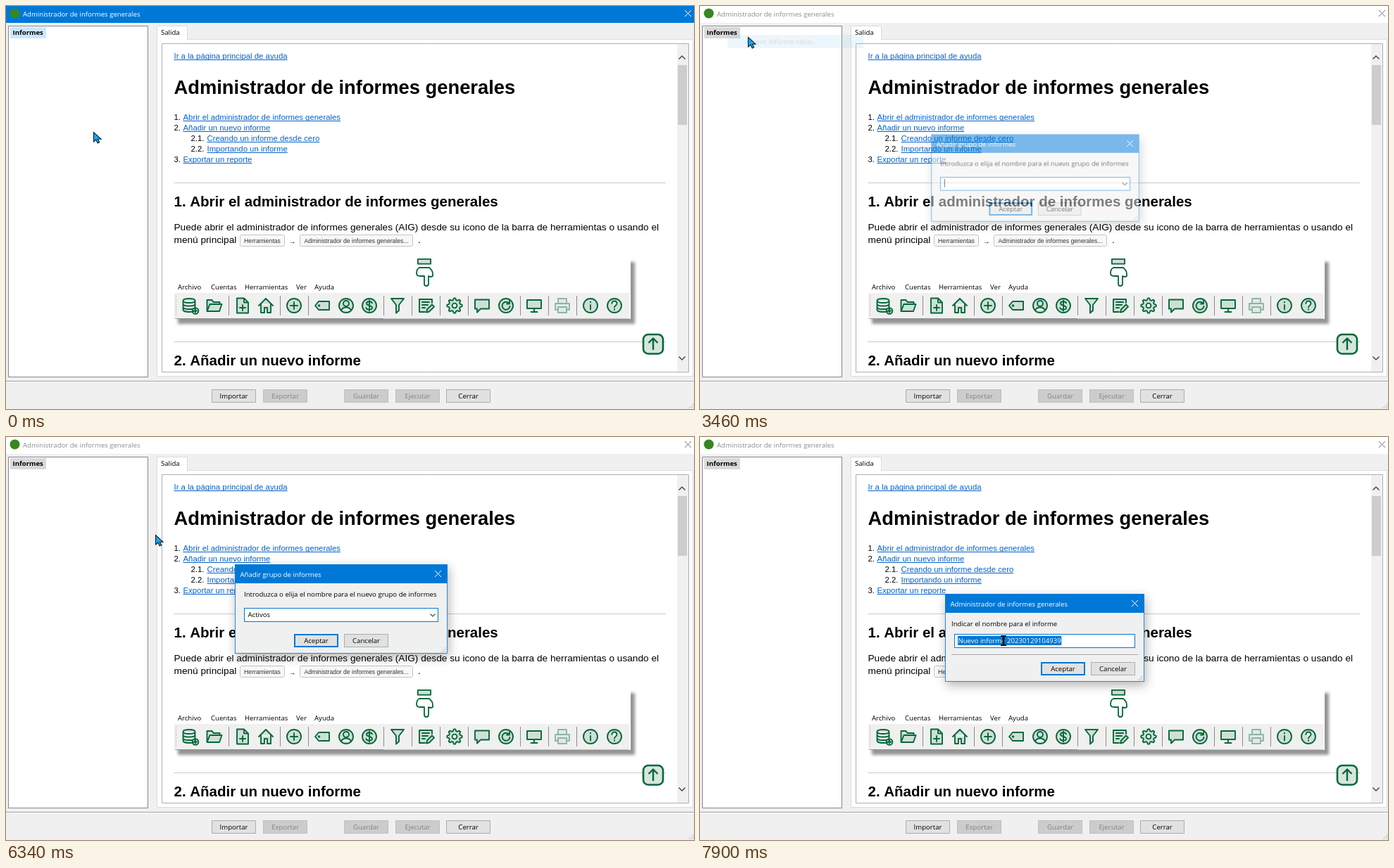
These frames come from a looping animation (977 by 573 pixels, 8 s). An HTML page with a canvas:

```html
<!DOCTYPE html>
<html lang="es">
<head>
<meta charset="utf-8">
<title>Administrador de informes generales</title>
<style>
html, body { margin: 0; width: 100%; height: 100%; overflow: hidden; background: #f0f0f0; }
canvas { display: block; }
</style>
</head>
<body>
<canvas id="stage" width="977" height="573"></canvas>
<script>
const W = 977, H = 573, LOOP = 8000;
const stage = document.getElementById('stage').getContext('2d');
const layerCanvas = document.createElement('canvas');
layerCanvas.width = W;
layerCanvas.height = H;
const layer = layerCanvas.getContext('2d');
let g = stage;

const UI = '9.6px "Open Sans", sans-serif';
const UI_BOLD = 'bold ' + UI;
const page = (px, bold) => (bold ? 'bold ' : '') + px + 'px "Liberation Sans", Arial, sans-serif';
const BLUE = '#0078d7', GREEN = '#05673a', PALE = '#cfdfd6';
const TITLE = 'Administrador de informes generales';

// Drawing helpers
function rect(x, y, w, h, fill, border, lw = 1) {
  if (fill) { g.fillStyle = fill; g.fillRect(x, y, w, h); }
  if (border) {
    g.strokeStyle = border;
    g.lineWidth = lw;
    g.strokeRect(x + lw / 2, y + lw / 2, w - lw, h - lw);
  }
}

function shadowed(x, y, w, h, fill, color, blur, dx, dy) {
  g.save();
  g.shadowColor = color;
  g.shadowBlur = blur;
  g.shadowOffsetX = dx;
  g.shadowOffsetY = dy;
  rect(x, y, w, h, fill);
  g.restore();
}

function text(s, x, y, font = UI, color = '#000', align = 'left') {
  g.font = font;
  g.fillStyle = color;
  g.textAlign = align;
  g.fillText(s, x, y);
}

function stroke(d, color, lw = 1) {
  g.strokeStyle = color;
  g.lineWidth = lw;
  g.stroke(new Path2D(d));
}

function disc(x, y, r, color) {
  g.fillStyle = color;
  g.beginPath();
  g.arc(x, y, r, 0, 7);
  g.fill();
}

function link(s, x, y) {
  text(s, x, y, page(11.37), '#0563c9');
  rect(x, y + 1, g.measureText(s).width, 1, '#0563c9');
}

function button(s, x, y, state = 'normal') {
  const looks = {
    normal: ['#e1e1e1', '#adadad', 1],
    off: ['#cccccc', '#bfbfbf', 1],
    main: ['#e1e1e1', BLUE, 2],
    hover: ['#e5f1fb', BLUE, 1],
    down: ['#cce4f7', '#005499', 1]
  };
  const [fill, border, lw] = looks[state];
  rect(x, y, 63, 19, fill, border, lw);
  text(s, x + 31.5, y + 13, UI, state === 'off' ? '#838383' : '#000', 'center');
}

function cross(x, y, color) {
  stroke(`M${x - 4.5} ${y - 4.5}l9 9m0-9l-9 9`, color);
}

function grip(x, y) {
  for (let i = 0; i < 3; i++)
    for (let j = 0; j <= i; j++) rect(x - 2 - j * 2.6, y - 7 + i * 2.6, 1.4, 1.4, '#bbb');
}

// Toolbar icons on a 24 unit grid
const ring = (x, y, r) => `M${x - r} ${y}a${r} ${r} 0 1 0 ${2 * r} 0a${r} ${r} 0 1 0 ${-2 * r} 0z`;

function icon(x, d, alpha = 1) {
  const p = new Path2D(d);
  g.save();
  g.globalAlpha = alpha;
  g.translate(x - 12, 414);
  g.lineJoin = g.lineCap = 'round';
  g.fillStyle = PALE;
  g.fill(p);
  g.strokeStyle = GREEN;
  g.lineWidth = 1.9;
  g.stroke(p);
  g.restore();
}

function gear() {
  let d = '';
  for (let i = 0; i < 32; i++) {
    const r = i % 4 < 2 ? 10.7 : 8, a = (i - 0.5) * Math.PI / 16;
    d += (i ? 'L' : 'M') + (12 + r * Math.cos(a)) + ' ' + (12 + r * Math.sin(a));
  }
  return d + 'z' + ring(12, 12, 3.4);
}

function toolbar() {
  shadowed(238, 357, 649, 88, '#fff', 'rgba(0,0,0,.42)', 4, 6, 6.5);
  rect(239, 408, 646, 37, '#f0f0f0');
  rect(239, 444, 646, 1, '#c4c4c4');
  rect(242, 444, 294, 1, '#8f8f8f');
  for (let y = 412; y < 442; y += 3) rect(241, y, 1, 1, '#999');

  text('Archivo', 244, 403);
  text('Cuentas', 291, 403);
  text('Herramientas', 339, 403);
  text('Ver', 412, 403);
  text('Ayuda', 438, 403);
  for (const x of [316, 389, 429, 536, 576, 616, 656, 730, 770, 810]) rect(x, 412, 1, 28, '#8c8c8c');

  const big = ring(12, 12, 10);
  icon(262, 'M1.5 5c0-4 17-4 17 0v13c0 4-17 4-17 0zM1.5 5c0 4 17 4 17 0M1.5 9.5c0 4 17 4 17 0M1.5 14c0 4 17 4 17 0'
    + ring(19, 19.5, 4.3) + 'M19 17.5v4M17 19.5h4');
  icon(296, 'M1.5 20V4h7l2 3h9v3M1.5 20l4-10h17l-3.5 10z');
  icon(336, 'M4 1.5h10l6 6v15H4zM14 1.5v6h6M12 11v8M8 15h8');
  icon(369, 'M2 12L12 2l10 10M5 9.5V22h5v-7h4v7h5V9.5');
  icon(409, big + 'M12 7v10M7 12h10');
  icon(449, 'M2 12l5-6h15v12H7z' + ring(7.5, 12, 0.8));
  icon(483, big + ring(12, 9, 4) + 'M5 19c2-6 12-6 14 0');
  icon(516, big + 'M16 8.5c-1-3-8-3-8 .5c0 3.5 8 2.5 8 6c0 3.5-8 3.5-8.5 0M12 4.5v15');
  icon(556, 'M3 2h18l-7 9v8l-4 3.5V11z');
  icon(597, 'M20 8V3H2v18h8M6 7h10M6 11h8M6 15h4M12 21.5l1-4 7-7 3 3-7 7z');
  icon(637, gear());
  icon(676, 'M2 3.5h20v13H10l-5 5v-5H2z');
  icon(710, big + 'M16.5 9a5.5 5.5 0 1 0 1 4M17 5.5V9.5h-4');
  icon(750, 'M2 4h20v12H2zM12 16v5M7.5 21h9');
  icon(790, 'M6 9V2h12v7M6 18H2V9h20v9h-4M6 14h12v8H6z', 0.4);
  icon(830, big + 'M12 11v6.5M12 6.8v.6');
  icon(864, big + 'M8.5 9c0-5 7-4.5 7 0c0 3-3.5 2.5-3.5 5.5M12 17.3v.5');

  g.lineJoin = 'round';
  rect(584, 359, 20, 8.5, PALE, GREEN, 1.8);
  stroke('M587 372h14q5 4 5 9v3q-3 2-6 0v11q0 3-3 3t-3-3v-11h-6q-5 0-5-4 0-6 4-8z', GREEN, 1.8);
}

function helpPage() {
  link('Ir a la página principal de ayuda', 238.5, 75);
  text(TITLE, 238.5, 125, page(27.35, true));

  const items = [
    ['1.', 'Abrir el administrador de informes generales', 238.5, 251.5],
    ['2.', 'Añadir un nuevo informe', 238.5, 251.5],
    ['2.1.', 'Creando un informe desde cero', 262.5, 285.5],
    ['2.2.', 'Importando un informe', 262.5, 285.5],
    ['3.', 'Exportar un reporte', 238.5, 251.5]
  ];
  items.forEach(([n, s, x, lx], i) => {
    const y = 162 + i * 15;
    text(n, x, y, page(11.37));
    link(s, lx, y);
  });

  rect(238, 251, 699, 1, '#cbcbcb');
  text('1. Abrir el administrador de informes generales', 238.5, 285, page(20.5, true));
  text('Puede abrir el administrador de informes generales (AIG) desde su icono de la barra de herramientas o usando el',
    238.5, 319, page(13.67));
  text('menú principal', 238.5, 337, page(13.67));
  for (const [s, x, w] of [['Herramientas', 332.5, 63], [TITLE + '...', 417.5, 160]]) {
    g.beginPath();
    g.roundRect(x, 325.5, w, 16, 2);
    g.fillStyle = '#f8f8f8';
    g.fill();
    g.strokeStyle = '#c4c4c4';
    g.lineWidth = 1;
    g.stroke();
    text(s, x + w / 2, 337, page(8.63), '#333', 'center');
  }
  text('→', 402, 338, page(9.5));
  text('.', 585, 337, page(13.67));

  toolbar();

  rect(238, 477, 699, 1, '#cbcbcb');
  text('2. Añadir un nuevo informe', 238.5, 511, page(20.5, true));

  g.beginPath();
  g.roundRect(905, 467, 28, 27.5, 7);
  g.fillStyle = '#d6e6dc';
  g.fill();
  g.strokeStyle = GREEN;
  g.lineWidth = 2.6;
  g.stroke();
  stroke('M919 489v-16M912.5 479l6.5-6.5 6.5 6.5', GREEN, 2.4);
}

function mainWindow(active) {
  rect(0, 0, W, H, '#f0f0f0');
  rect(0, 0, W, 24, active ? BLUE : '#fff');
  disc(12.5, 10.5, 7, '#37861f');
  text(TITLE, 24, 15, UI, active ? '#fff' : '#8c8c8c');
  cross(968.5, 10.5, active ? '#fff' : '#777');

  rect(3, 28, 199, 500, '#fff', '#828790');
  rect(6, 30, 51, 16, active ? '#cce8ff' : '#d9d9d9');
  text('Informes', 9.5, 41, UI_BOLD);

  rect(214, 47, 762, 480, '#fff', '#dcdcdc');
  rect(214, 28, 44, 21, '#fff', '#dcdcdc');
  rect(215, 46, 42, 4, '#fff');
  text('Salida', 220, 41);
  rect(221, 53, 749, 468, '#fff', '#acafb5');
  helpPage();

  rect(953, 54, 16, 466, '#f0f0f0');
  rect(954, 84, 13, 85, '#cdcdcd');
  stroke('M955.5 75.5l4.5-4.5 4.5 4.5M955.5 498.5l4.5 4.5 4.5-4.5', '#505050', 1.6);

  rect(0, 533, W, 1, '#a0a0a0');
  rect(0, 534, W, 1, '#fff');
  button('Importar', 292, 545);
  button('Exportar', 365, 545, 'off');
  button('Guardar', 480, 545, 'off');
  button('Ejecutar', 553, 545, 'off');
  button('Cerrar', 625, 545);
  grip(977, 572);
}

function menuItem(s, y, on = true) {
  text(s, 66.5, y + 4, UI, on ? '#000' : '#6d6d6d');
}

function menu(hot) {
  shadowed(37, 39, 198, 154, '#f2f2f2', 'rgba(0,0,0,.55)', 3, 2.5, 2.5);
  rect(37, 39, 198, 154, null, '#cccccc');
  if (hot) rect(39, 41, 193, 19, '#91c9f7');
  menuItem('Nuevo informe vacío...', 50);
  menuItem('Nuevo informe de ejemplo', 69);
  menuItem('Renombrar grupo...', 94, false);
  menuItem('Desagrupar', 112, false);
  menuItem('Renombrar informe...', 131, false);
  menuItem('Activo', 156, false);
  menuItem('Borrar informe...', 181, false);
  for (const y of [81, 144, 168]) rect(63, y, 168, 1, '#d2d2d2');
  stroke('M221.5 66l3 3-3 3', '#222');
}

function frame(x, y, w, h, title) {
  shadowed(x, y, w, h, '#f0f0f0', 'rgba(0,0,0,.3)', 14, 2, 5);
  rect(x, y, w, h, null, '#2b8ad8');
  rect(x, y, w, 27, BLUE);
  text(title, x + 7.5, y + 18, UI, '#fff');
  cross(x + w - 13.5, y + 13.5, '#fff');
  grip(x + w - 2, y + h - 2);
}

function groupDialog(value, caret, state) {
  frame(325, 181, 302, 127, 'Añadir grupo de informes');
  text('Introduzca o elija el nombre para el nuevo grupo de informes', 338, 227);
  rect(338, 243, 276, 20, '#fff', BLUE);
  stroke('M602.5 251.5l3.5 3.5 3.5-3.5', '#444', 1.1);
  text(value, 343.5, 256);
  if (caret) rect(Math.round(344 + g.measureText(value).width), 246, 1, 12, '#000');
  button('Aceptar', 409, 280, state);
  button('Cancelar', 480, 280);
}

function nameDialog() {
  frame(348, 223, 283, 125, TITLE);
  text('Indicar el nombre para el informe', 357, 269);
  rect(361, 280, 257, 20, '#fff', BLUE);
  const s = 'Nuevo informe 20230129104939';
  g.font = UI;
  rect(366, 283, g.measureText(s).width + 1, 13, BLUE);
  text(s, 366.5, 293, UI, '#fff');
  rect(357, 309, 265, 1, '#a0a0a0');
  rect(357, 310, 265, 1, '#fff');
  button('Aceptar', 484, 320, 'main');
  button('Cancelar', 555, 320);
}

// Draws a group of shapes as one translucent, scaled sheet
function sheet(alpha, scale, cx, cy, draw) {
  if (alpha <= 0) return;
  layer.clearRect(0, 0, W, H);
  g = layer;
  draw();
  g = stage;
  g.save();
  g.globalAlpha = alpha;
  g.translate(cx, cy);
  g.scale(scale, scale);
  g.drawImage(layerCanvas, -cx, -cy);
  g.restore();
}

// Timing
const clamp = v => Math.max(0, Math.min(1, v));
const between = (t, a, b) => t >= a && t < b;
const fadeIn = (t, start, span) => 1 - (1 - clamp((t - start) / span)) ** 2;

const TICK = 70;
const moves = [
  [440, 1140, 31, 29],
  [1400, 1540, 37, 40],
  [2410, 2830, 68, 44],
  [3850, 4070, 137, 96],
  [6260, 7010, 432, 265],
  [7080, 7270, 430, 289]
];
const keys = [4860, 4930, 5190, 5260, 5330, 5460, 5530];

function pointer(t) {
  let x = 124, y = 179;
  for (const [a, b, tx, ty] of moves) {
    if (t < a) break;
    const n = Math.round((b - a) / TICK) + 1;
    const k = 1 - (1 - clamp((Math.floor((t - a) / TICK) + 1) / n)) ** 1.6;
    x += (tx - x) * k;
    y += (ty - y) * k;
  }
  return [Math.round(x), Math.round(y)];
}

function arrow(x, y) {
  g.save();
  g.translate(x + 0.5, y + 0.5);
  const p = new Path2D('M0 0v13.5l3.3-2.8 2.4 4.8 2.5-1.2-2.3-4.6h4.6z');
  g.fillStyle = '#18a8f0';
  g.fill(p);
  g.lineJoin = 'miter';
  g.strokeStyle = '#10202c';
  g.lineWidth = 1.1;
  g.stroke(p);
  g.restore();
}

function beam(x, y) {
  stroke(`M${x - 4} ${y - 6}h8m-8 13h8`, '#111', 2);
  stroke(`M${x} ${y - 6}v13`, '#111', 3);
}

function draw(t) {
  const [x, y] = pointer(t);
  const naming = t >= 7740;
  mainWindow(t < 3370 || between(t, 7620, 7740));

  if (between(t, 1870, 3300)) sheet(clamp((t - 1800) / 210), 1, 0, 0, () => menu(t >= 2690));
  if (between(t, 3300, 3490)) {
    sheet(1 - (t - 3300) / 190, 1, 0, 0, () => {
      rect(39, 41, 193, 19, '#91c9f7');
      menuItem('Nuevo informe vacío...', 50);
    });
  }

  if (between(t, 3380, 7740)) {
    const k = Math.min(fadeIn(t, 3380, 260), 1 - clamp((t - 7620) / 120));
    const caret = between(t, 3380, 3870) || between(t, 4400, 6060) || between(t, 6590, 7120);
    const over = between(x, 409, 472) && between(y, 280, 299);
    const state = between(t, 7410, 7620) ? 'down' : over ? 'hover' : 'main';
    const value = 'Activos'.slice(0, keys.filter(key => t >= key).length);
    sheet(k, 0.955 + 0.045 * k, 476, 244.5, () => groupDialog(value, caret, state));
  }
  if (naming) {
    const k = fadeIn(t, 7740, 150);
    sheet(k, 0.955 + 0.045 * k, 489.5, 285.5, nameDialog);
  }

  if (between(t, 1740, 1950)) disc(x - 0.5, y - 1.5, 10, 'rgba(218,40,54,.64)');
  if (between(t, 3160, 3300) || between(t, 7410, 7620)) disc(x, y, 10, 'rgba(240,232,0,.64)');

  if (between(t, 4930, 6260)) return;
  const inCombo = between(t, 6260, 7080) && between(x, 338, 598) && between(y, 243, 263);
  if (inCombo || naming) beam(x + 1, y);
  else arrow(x, y);
}

const start = performance.now();
function tick() {
  draw((performance.now() - start) % LOOP);
  requestAnimationFrame(tick);
}
tick();
</script>
</body>
</html>
```
